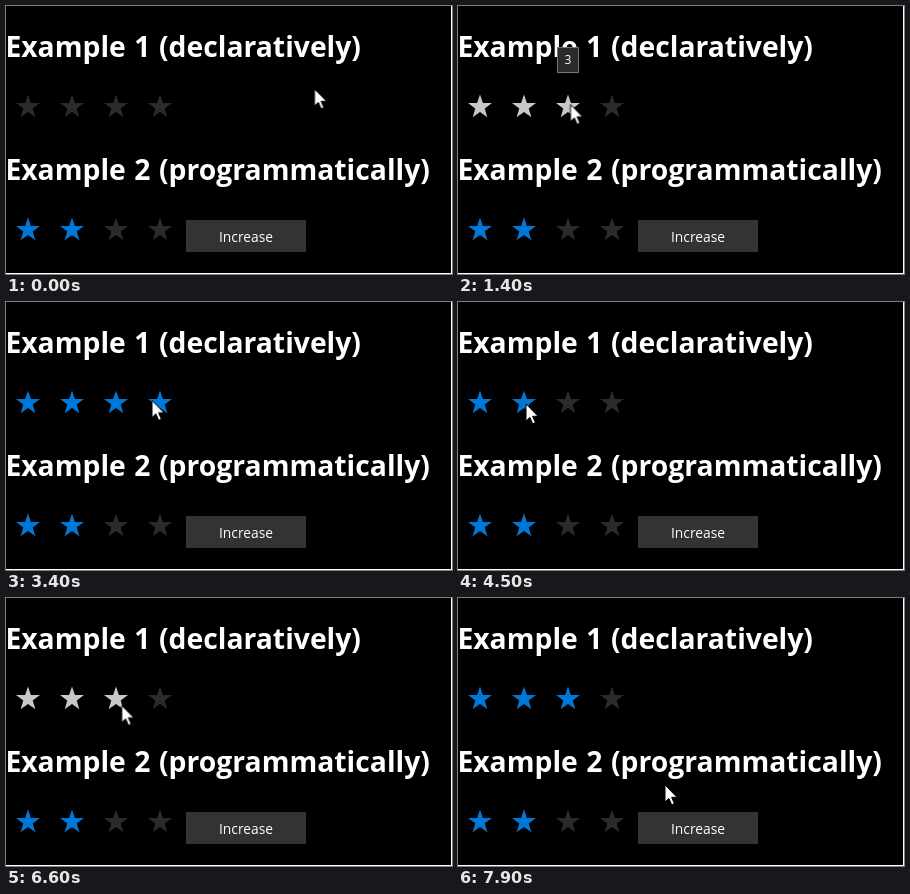
Write an HTML page that moves like this. It is 446 px wide and 268 px high and loops after 8 s.

```html
<!DOCTYPE html>
<html lang="en">
<head>
<meta charset="utf-8">
<title>Star rating</title>
<style>
  html, body { margin: 0; width: 100%; height: 100%; overflow: hidden; background: #fff; }
  svg { display: block; width: 446px; height: 268px; font-family: "Open Sans", "Noto Sans", sans-serif; }
  svg { --off: #2b2b2b; --lit: #c8c8c8; --set: #0078d7; }

  .title { font-size: 28.3px; font-weight: 700; fill: #fff; word-spacing: 1.2px; }
  .label { font-size: 13.8px; font-weight: 500; fill: #fff; text-anchor: middle; }
  .on { fill: var(--set); }
  .off { fill: var(--off); }

  .low, .third, .fourth, .tip { animation: 8s step-end infinite; }
  .low { animation-name: low; }
  .third { animation-name: third; }
  .fourth { animation-name: fourth; }

  .tip rect { fill: #2b2b2b; stroke: #767676; }
  .tip text { font-size: 12px; fill: #fff; text-anchor: middle; }
  .tip2 { animation-name: tip2; }
  .tip3 { animation-name: tip3; }
  .tip4 { animation-name: tip4; }

  .cursor { fill: #fff; stroke: #000; animation: pointer 8s infinite; }

  /* Ratings: hovering lights stars, clicking sets them */
  @keyframes low {
    0% { fill: var(--off); }
    8.75%, 21.25%, 32.5%, 46.25%, 61.25%, 82.5% { fill: var(--lit); }
    18.75%, 28.75%, 41.25%, 56.25%, 75%, 85%, 100% { fill: var(--set); }
  }
  @keyframes third {
    0%, 22.5%, 47.5% { fill: var(--off); }
    8.75%, 21.25%, 33.75%, 46.25%, 62.5%, 82.5% { fill: var(--lit); }
    18.75%, 41.25%, 75%, 85%, 100% { fill: var(--set); }
  }
  @keyframes fourth {
    0%, 10%, 46.25%, 100% { fill: var(--off); }
    8.75%, 37.5% { fill: var(--lit); }
    41.25% { fill: var(--set); }
  }

  @keyframes tip2 {
    0%, 30%, 56.25%, 100% { opacity: 0; }
    26.25% { opacity: 1; }
    28.75%, 55% { opacity: .5; }
  }
  @keyframes tip3 {
    0%, 20%, 77.5%, 100% { opacity: 0; }
    17.5%, 73.75% { opacity: 1; }
    18.75%, 76.25% { opacity: .5; }
    72.5% { opacity: .2; }
    75% { opacity: .8; }
  }
  @keyframes tip4 {
    0%, 42.5%, 100% { opacity: 0; }
    40% { opacity: 1; }
    41.25% { opacity: .5; }
  }

  /* The pointer moves ten times a second */
  @keyframes pointer {
    0% { transform: translate(308.5px, 83px); animation-timing-function: steps(5); }
    6.25% { transform: translate(215px, 92px); animation-timing-function: steps(2); }
    8.75% { transform: translate(158px, 97px); animation-timing-function: steps(2); }
    11.25% { transform: translate(114px, 98px); animation-timing-function: steps(3); }
    15% { transform: translate(112.5px, 98.5px); animation-timing-function: step-end; }
    20% { transform: translate(112.5px, 98.5px); animation-timing-function: steps(3); }
    23.75% { transform: translate(92px, 101px); animation-timing-function: step-end; }
    26.25% { transform: translate(66px, 102px); animation-timing-function: step-end; }
    31.25% { transform: translate(66px, 102px); animation-timing-function: steps(6); }
    38.75% { transform: translate(146px, 98.5px); animation-timing-function: step-end; }
    45% { transform: translate(146px, 98.5px); animation-timing-function: steps(2); }
    47.5% { transform: translate(68px, 102px); animation-timing-function: step-end; }
    60% { transform: translate(68px, 102px); animation-timing-function: steps(3); }
    63.75% { transform: translate(102.5px, 99.5px); animation-timing-function: step-end; }
    81.25% { transform: translate(102.5px, 99.5px); animation-timing-function: steps(7); }
    90% { transform: translate(195px, 155.5px); animation-timing-function: steps(2); }
    92.5% { transform: translate(199px, 165px); animation-timing-function: steps(5); }
    98.75%, 100% { transform: translate(207px, 187px); animation-timing-function: step-end; }
  }
</style>
</head>
<body>
<svg viewBox="0 0 446 268">
  <defs>
    <path id="star" d="M0-12.5 2.9-4H12L4.7 1.5 7.4 10.2 0 4.9-7.4 10.2-4.7 1.5-12-4H-2.9z"/>
  </defs>
  <rect width="445" height="267"/>

  <text class="title" x="-.6" y="51.3">Example 1 (declaratively)</text>
  <use class="low" href="#star" x="22" y="101"/>
  <use class="low" href="#star" x="66" y="101"/>
  <use class="third" href="#star" x="110" y="101"/>
  <use class="fourth" href="#star" x="154" y="101"/>

  <text class="title" x="-.6" y="174.3">Example 2 (programmatically)</text>
  <use class="on" href="#star" x="22" y="224"/>
  <use class="on" href="#star" x="66" y="224"/>
  <use class="off" href="#star" x="110" y="224"/>
  <use class="off" href="#star" x="154" y="224"/>
  <rect x="180" y="214" width="120" height="32" fill="#333"/>
  <text class="label" x="240" y="235.5">Increase</text>

  <g class="tip tip2"><rect x="55.5" y="41.5" width="21" height="25"/><text x="66" y="58">2</text></g>
  <g class="tip tip3"><rect x="99.5" y="41.5" width="21" height="25"/><text x="110" y="58">3</text></g>
  <g class="tip tip4"><rect x="143.5" y="41.5" width="21" height="25"/><text x="154" y="58">4</text></g>

  <path class="cursor" d="M0 0V17L3.9 13.4 6.7 19.8 9.4 18.6 6.6 12.3H12z"/>
</svg>
</body>
</html>
```
